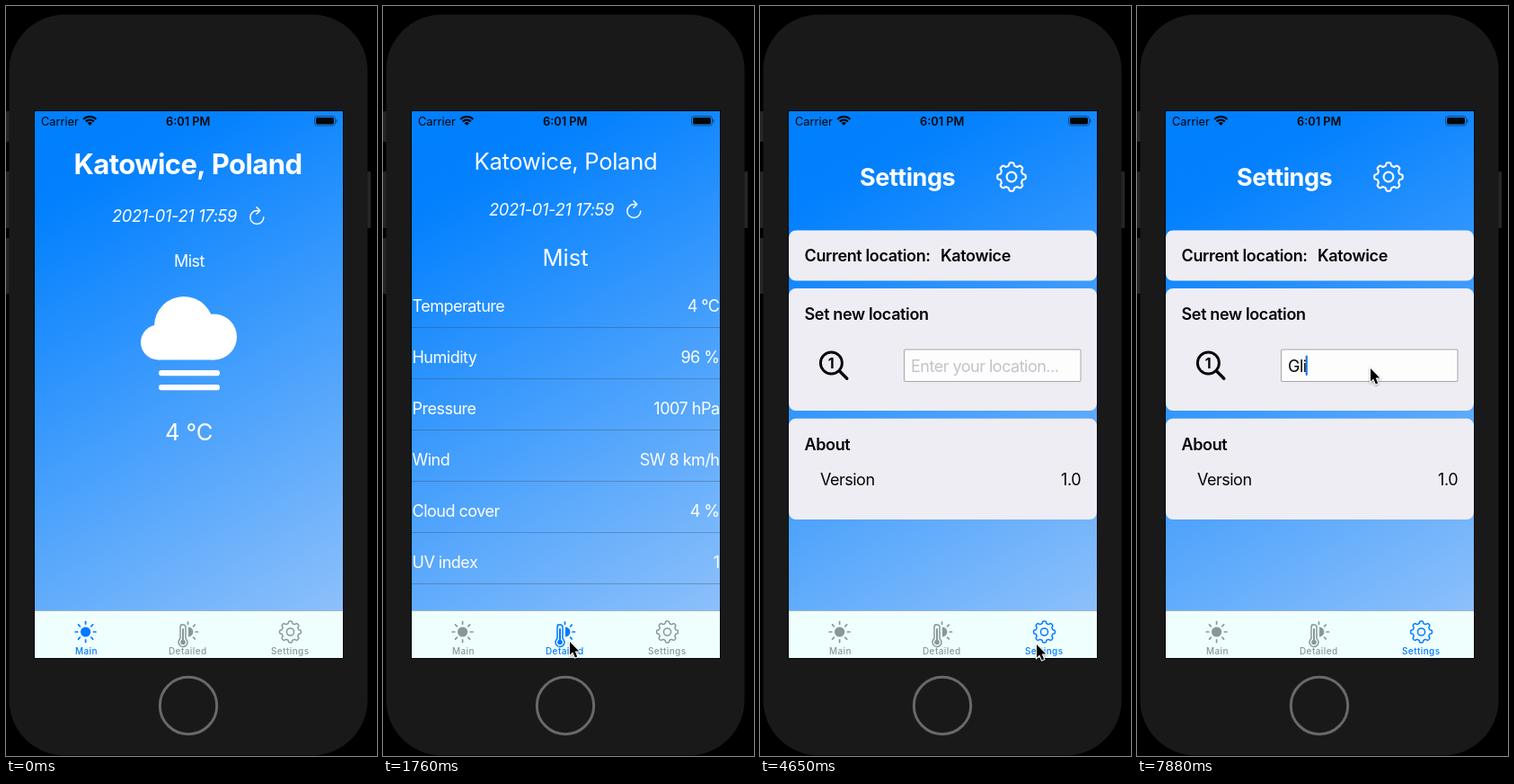
An HTML page with a canvas for the animation above (8000 ms loop, 413x834 px).

```html
<!DOCTYPE html>
<html lang="en">
<head>
<meta charset="utf-8">
<title>Weather app</title>
<style>
  html, body { margin: 0; width: 100%; height: 100%; overflow: hidden; background: #000; }
  canvas { display: block; width: 413px; height: 834px; }
</style>
</head>
<body>
<canvas id="stage"></canvas>
<script>
const W = 413, H = 834, LOOP = 8000, TAU = Math.PI * 2;
const BLUE = '#007aff', GREY = '#859999', WHITE = '#fff', INK = '#050505';
const canvas = document.getElementById('stage');
const ctx = canvas.getContext('2d');
const dpr = window.devicePixelRatio || 1;
canvas.width = W * dpr;
canvas.height = H * dpr;

// Pointer stops: time, x, y; each one holds until the next
const stops = [
  [800, 351, 386], [1000, 353, 387], [1100, 258, 530], [1190, 175, 625],
  [1290, 180, 655], [1380, 192, 686], [1480, 203, 703], [1570, 208, 707],
  [3760, 207.5, 707], [3960, 212, 708], [4060, 272, 708],
  [4260, 287, 710], [4360, 302, 710], [4450, 308, 710]
];
const glide = { from: [308, 710], to: [260, 403], start: 4840, step: 97.2, count: 8 };

function fillBox(x, y, w, h, r, color) {
  ctx.beginPath();
  ctx.roundRect(x, y, w, h, r);
  ctx.fillStyle = color;
  ctx.fill();
}

function disc(x, y, r, color) {
  ctx.beginPath();
  ctx.arc(x, y, r, 0, TAU);
  ctx.fillStyle = color;
  ctx.fill();
}

function ring(x, y, r, width, color) {
  ctx.beginPath();
  ctx.arc(x, y, r, 0, TAU);
  ctx.lineWidth = width;
  ctx.strokeStyle = color;
  ctx.stroke();
}

function line(points, width, color) {
  ctx.beginPath();
  points.forEach(([x, y]) => ctx.lineTo(x, y));
  ctx.lineWidth = width;
  ctx.strokeStyle = color;
  ctx.lineCap = ctx.lineJoin = 'round';
  ctx.stroke();
}

// y is the middle of the capital letters
function text(str, x, y, { size = 18, weight = 400, color = WHITE, track = -0.028, align = 'left', italic = false } = {}) {
  ctx.font = `${italic ? 'italic ' : ''}${weight} ${size}px Inter, Roboto, sans-serif`;
  ctx.letterSpacing = `${track * size}px`;
  ctx.textAlign = align;
  ctx.fillStyle = color;
  ctx.fillText(str, x, y + size * 0.364);
  return ctx.measureText(str).width;
}

function rays(x, y, r1, r2, from, to, color) {
  for (let i = from; i <= to; i++) {
    const c = Math.cos(i * TAU / 8), s = Math.sin(i * TAU / 8);
    line([[x + c * r1, y + s * r1], [x + c * r2, y + s * r2]], 1.7, color);
  }
}

function gear(x, y, r, width, color) {
  const outline = [];
  for (let i = 0; i <= 160; i++) {
    const a = i * TAU / 160;
    const d = r * (0.87 + 0.1 * Math.tanh(2.4 * Math.cos(8 * a)));
    outline.push([x + d * Math.cos(a), y + d * Math.sin(a)]);
  }
  line(outline, width, color);
  ring(x, y, r * 0.33, width, color);
}

function sun(x, y, color) {
  disc(x, y, 5.6, color);
  rays(x, y, 8.8, 11.4, 0, 7, color);
}

function thermometer(x, y, color) {
  ctx.beginPath();
  ctx.arc(x + 6, y, 5.4, -Math.PI / 2, Math.PI / 2);
  ctx.fillStyle = color;
  ctx.fill();
  rays(x + 5.5, y, 8.6, 11, -3, 1, color);
  ctx.beginPath();
  ctx.arc(x, y + 11.5, 5, -0.93, Math.PI + 0.93);
  ctx.lineTo(x - 3, y - 5);
  ctx.arc(x, y - 5, 3, Math.PI, 0);
  ctx.closePath();
  ctx.fillStyle = '#effffe';
  ctx.fill();
  ctx.lineWidth = 1.5;
  ctx.strokeStyle = color;
  ctx.stroke();
  line([[x, y - 3], [x, y + 10]], 2, color);
  disc(x, y + 11.5, 2.8, color);
}

function refresh(x, y) {
  ctx.beginPath();
  ctx.arc(x, y, 7.5, 0, TAU - 1.35);
  ctx.lineWidth = 1.5;
  ctx.strokeStyle = WHITE;
  ctx.lineCap = 'round';
  ctx.stroke();
  line([[x - 0.3, y - 11.3], [x + 3.5, y - 7.5], [x - 0.3, y - 3.8]], 1.5, WHITE);
}

function drawPhone() {
  ctx.fillStyle = '#000';
  ctx.fillRect(0, 0, W, H);
  for (const [x, y, h] of [[0, 117, 34], [0, 184, 63], [0, 258, 62], [402, 184, 63]])
    fillBox(x, y, x ? 4 : 5, h, 1, '#252525');
  fillBox(3.5, 9.5, 399, 824, 62, '#191919');
  ring(203, 778, 31.7, 3, '#696969');
  fillBox(31, 116, 345, 610, 0, '#050a10');

  const sky = ctx.createLinearGradient(32, 117, 375, 725);
  sky.addColorStop(0, '#007ffe');
  sky.addColorStop(0.14, '#0280fe');
  sky.addColorStop(1, '#98c5fa');
  fillBox(32, 117, 343, 608, 0, sky);
}

function drawStatus() {
  text('Carrier', 39, 128.5, { size: 12.8, color: INK, track: 0 });
  text('6:01 PM', 178, 128.5, { size: 12.8, weight: 600, color: INK, track: 0 });
  for (const r of [10, 6.4]) {
    ctx.beginPath();
    ctx.arc(93.3, 133, r, -Math.PI * 0.75, -Math.PI * 0.25);
    ctx.lineWidth = 2.2;
    ctx.lineCap = 'butt';
    ctx.strokeStyle = INK;
    ctx.stroke();
  }
  ctx.beginPath();
  ctx.moveTo(93.3, 133);
  ctx.arc(93.3, 133, 3.8, -Math.PI * 0.75, -Math.PI * 0.25);
  ctx.fillStyle = INK;
  ctx.fill();
  ctx.beginPath();
  ctx.roundRect(343.5, 122.5, 23, 10.5, 3);
  ctx.lineWidth = 1;
  ctx.strokeStyle = 'rgba(0,0,0,.45)';
  ctx.stroke();
  fillBox(345, 124, 20, 7.5, 1.8, INK);
  fillBox(367.3, 126, 1.3, 3.5, 0.6, 'rgba(0,0,0,.45)');
}

function drawTabs(active) {
  fillBox(32, 672, 343, 53, 0, '#effffe');
  fillBox(32, 672, 343, 1, 0, 'rgba(40,70,100,.4)');
  const tint = i => i === active ? BLUE : GREY;
  sun(88.6, 696, tint(0));
  thermometer(197, 696, tint(1));
  gear(316.5, 696, 12.3, 1.5, tint(2));
  [['Main', 77], ['Detailed', 181], ['Settings', 295]].forEach(([label, x], i) =>
    text(label, x, 717.2, { size: 10, weight: 500, color: tint(i), track: 0.04 }));
}

function drawDate(y) {
  text('2021-01-21 17:59', 118, y, { size: 18.3, italic: true, track: -0.02 });
  refresh(279.3, y + 2);
}

function drawMain() {
  text('Katowice, Poland', 75.5, 175.5, { size: 31.1, weight: 700, track: -0.02 });
  drawDate(233);
  text('Mist', 187, 283);
  disc(198, 356, 33, WHITE);
  disc(169.5, 374, 19.5, WHITE);
  disc(231.5, 368, 25.5, WHITE);
  ctx.fillRect(169.5, 362, 62, 31.5);
  fillBox(170, 405, 68, 6.2, 3, WHITE);
  fillBox(170, 421, 68, 6.2, 3, WHITE);
  text('4 °C', 177, 474, { size: 25.6, track: -0.005 });
}

function drawDetailed() {
  text('Katowice, Poland', 101.5, 173, { size: 25.6, track: -0.012 });
  drawDate(226);
  text('Mist', 177.5, 280, { size: 25.6, track: 0 });
  const rows = [
    ['Temperature', '4 °C'], ['Humidity', '96 %'], ['Pressure', '1007 hPa'],
    ['Wind', 'SW 8 km/h'], ['Cloud cover', '4 %'], ['UV index', '1']
  ];
  rows.forEach(([label, value], i) => {
    const y = 333 + i * 57;
    text(label, 32.5, y);
    text(value, 374.5, y, { align: 'right' });
    fillBox(32, y + 24, 343, 1, 0, 'rgba(50,60,80,.32)');
  });
}

function caretAlpha(t) {
  if (t < 5810) return 0;
  if (t < 6410) return 1;
  if (t < 6500) return 0.5;
  if (t < 6700) return 0;
  return t < 6800 ? 0.5 : 1;
}

function drawSettings(t) {
  const bold = { weight: 600, color: INK, track: -0.02 };
  text('Settings', 111, 190, { size: 27, weight: 700, track: -0.015 });
  gear(280, 190, 16.3, 2.1, WHITE);
  for (const [y, h] of [[249.5, 56], [314, 136], [458.7, 112.3]])
    fillBox(32, y, 343, h, 8, '#eeedf3');
  text('Current location:', 49.5, 277.5, bold);
  text('Katowice', 201, 277.5, bold);
  text('Set new location', 49.5, 342, bold);
  text('About', 49.5, 487, bold);
  text('Version', 67, 526, { color: INK });
  text('1.0', 357, 526, { color: INK, align: 'right' });

  ring(79.4, 397, 12, 2.9, INK);
  line([[88.8, 406.2], [96.8, 414.2]], 3.4, INK);
  text('1', 79.2, 397, { size: 16, weight: 700, color: INK, track: 0, align: 'center' });

  fillBox(160, 381.5, 197.5, 36.5, 2, '#a6a6ab');
  fillBox(161, 382.5, 195.5, 34.5, 1, '#fdfdfe');
  const typed = 'Gli'.slice(0, t < 7300 ? 0 : t < 7590 ? 1 : t < 7880 ? 2 : 3);
  let caret = 167;
  if (typed) caret += text(typed, 168, 400, { color: INK });
  else text('Enter your location...', 168, 400, { color: '#c3c3c7' });
  ctx.globalAlpha = caretAlpha(t);
  fillBox(caret, 388.5, 2.2, 22.5, 1, '#1f78e6');
  ctx.globalAlpha = 1;
}

function pointerAt(t) {
  if (t >= glide.start) {
    const n = Math.min(glide.count, Math.floor((t - glide.start) / glide.step + 0.02) + 1);
    const p = n / glide.count, e = p * p * (3 - 2 * p);
    return glide.from.map((v, i) => v + (glide.to[i] - v) * e);
  }
  const stop = stops.filter(s => s[0] <= t).pop();
  return stop && stop.slice(1);
}

function drawPointer(t) {
  const pos = pointerAt(t);
  if (!pos) return;
  ctx.save();
  ctx.translate(pos[0], pos[1]);
  ctx.beginPath();
  for (const [x, y] of [[0, 0], [0, 14.6], [3.3, 11.5], [5.8, 17.4], [8.2, 16.4], [5.7, 10.6], [10.2, 10.6]])
    ctx.lineTo(x, y);
  ctx.closePath();
  ctx.lineJoin = 'miter';
  ctx.lineWidth = 2;
  ctx.strokeStyle = WHITE;
  ctx.shadowColor = 'rgba(0,0,0,.35)';
  ctx.shadowBlur = 2.5 * dpr;
  ctx.shadowOffsetY = dpr;
  ctx.stroke();
  ctx.shadowColor = 'transparent';
  ctx.fillStyle = '#000';
  ctx.fill();
  ctx.restore();
}

function draw(now) {
  const t = now % LOOP;
  const tab = t < 1760 ? 0 : t < 4650 ? 1 : 2;
  ctx.setTransform(dpr, 0, 0, dpr, 0, 0);
  drawPhone();
  drawStatus();
  [drawMain, drawDetailed, drawSettings][tab](t);
  drawTabs(tab);
  drawPointer(t);
}

function loop() {
  draw(performance.now());
  requestAnimationFrame(loop);
}
loop();
</script>
</body>
</html>
```
